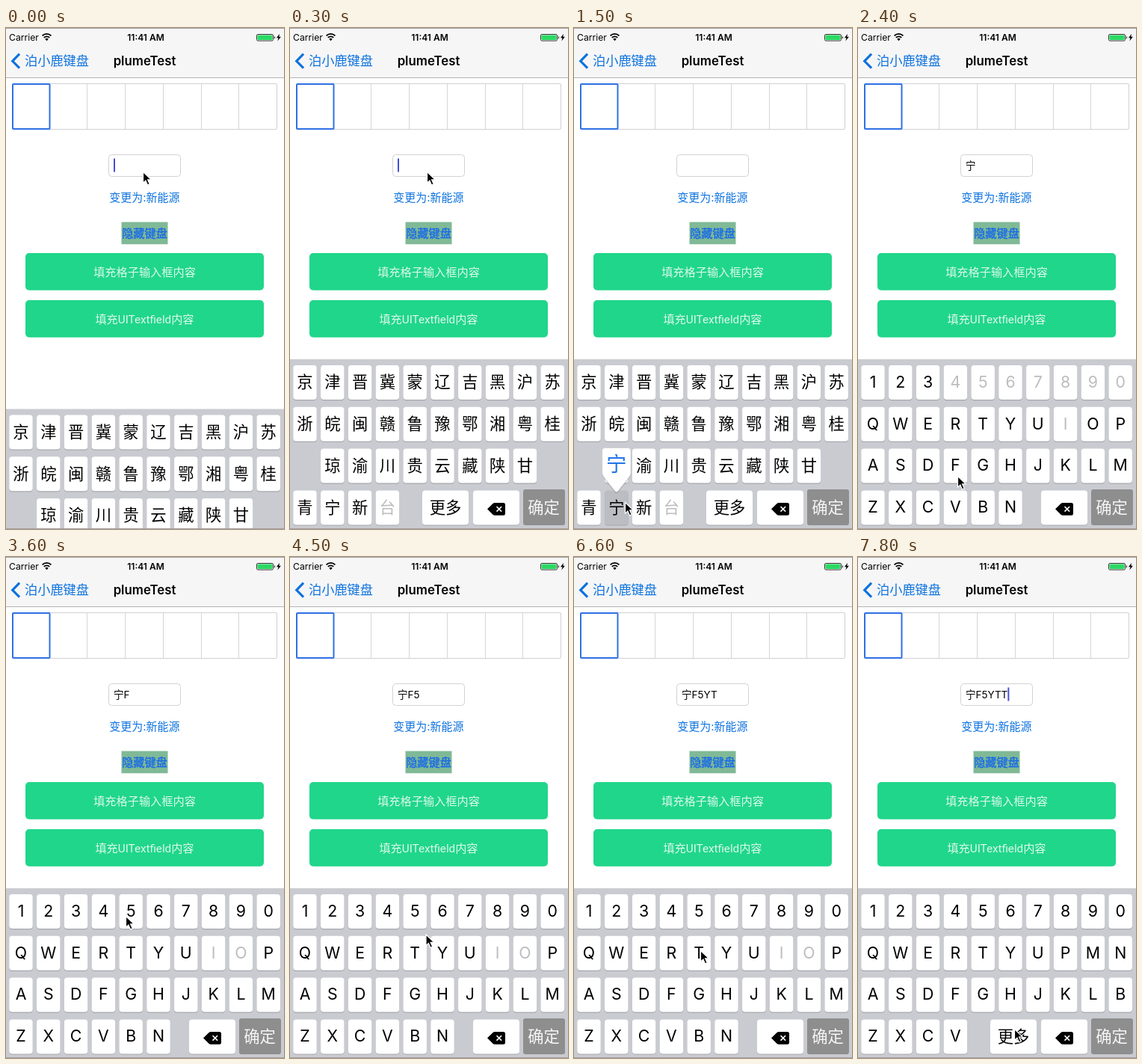
An HTML page for the animation above (8 s loop, 372 by 670 pixels).

```html
<!DOCTYPE html>
<html lang="zh-CN">
<head>
<meta charset="utf-8">
<title>Plate keyboard</title>
<style>
html, body { margin: 0; width: 100%; height: 100%; overflow: hidden; background: #fff; }
svg { display: block; width: 372px; height: 670px; }
text { font-family: Inter, "Noto Sans CJK SC", "Noto Sans CJK", sans-serif; white-space: pre; }
.mid { text-anchor: middle; }
.blue { fill: #0d72de; }
.fill { font: 15.2px Roboto, "Noto Sans CJK SC", "Noto Sans CJK", sans-serif; fill: #fff; fill-opacity: .85; }
.key { fill: #fff; }
.shade { fill: #a6a8ad; }
.down { fill: #bbbdc2; }
.cap { font-size: 21.3px; text-anchor: middle; fill: #000; }
.off { fill: #bdbdc0; }
.enter { fill: #fff; fill-opacity: .92; }
.tip { font-size: 27.5px; text-anchor: middle; fill: #1f74e6; }
</style>
</head>
<body>
<svg viewBox="0 0 372 670">
  <rect width="372" height="670" fill="#fff"/>
  <rect width="372" height="66" fill="#f6f6f7"/>
  <rect y="66" width="372" height="1" fill="#b4b4b6"/>
  <rect width="372" height="1" fill="#a2a2a2"/>

  <text x="4" y="16.5" font-size="12.2">Carrier</text>
  <path d="M48.6 10.4a8.2 8.2 0 0 1 11.8 0M50.8 12.9a5.2 5.2 0 0 1 7.4 0" fill="none" stroke="#000" stroke-width="1.9"/>
  <path d="M54.5 17.2l-2.2-2.5a3.2 3.2 0 0 1 4.4 0z"/>
  <text class="mid" x="187" y="16.5" font-size="12" font-weight="600">11:41 AM</text>
  <rect x="335.5" y="8.5" width="22" height="8.6" rx="1.6" fill="#fff" stroke="#333"/>
  <rect x="336.5" y="9.5" width="20" height="6.6" rx=".8" fill="#2bd964"/>
  <path d="M358.8 11v3.6q1.4-.4 1.4-1.8t-1.4-1.8z" fill="#333"/>
  <path d="M366 7.8l-4 5.4h2.5l-1.2 4.2 4.6-5.6h-2.6z"/>

  <path class="blue" d="M16.9 33.6l2.3 2.2-8.3 8.4 8.3 8.4-2.3 2.2L6.5 44.2z"/>
  <text class="blue" x="25" y="50.4" font-size="17.2">泊小鹿键盘</text>
  <text class="mid" x="185.5" y="50" font-size="16.8" font-weight="600">plumeTest</text>

  <rect x="8.5" y="74.5" width="354" height="61" rx="1.5" fill="#fff" stroke="#d0d0d6"/>
  <path d="M108.5 75v60M159.5 75v60M210.5 75v60M261.5 75v60M311.5 75v60" stroke="#d6d6da"/>
  <rect x="9" y="75" width="49.5" height="60" rx="1" fill="none" stroke="#2f70e4" stroke-width="2"/>

  <rect x="137.5" y="169.5" width="96" height="29" rx="4" fill="#fff" stroke="#d2d2d4"/>
  <text id="plate" x="144" y="189" font-size="13.5"></text>
  <rect id="caret" y="174.5" width="2" height="18" fill="#444fd4"/>

  <text class="mid blue" x="185.3" y="232" font-size="15">变更为:新能源</text>
  <rect x="154.5" y="259.5" width="62" height="29.700" fill="#80b996"/>
  <text class="mid" x="185.5" y="280" font-size="15.2" fill="#176ae8" stroke="#176ae8" stroke-width=".35">隐藏键盘</text>

  <g fill="#20d68a">
    <rect x="26" y="301" width="319" height="49.700" rx="5"/>
    <rect x="26" y="364" width="319" height="49.700" rx="5"/>
  </g>
  <text class="fill mid" x="185.5" y="332">填充格子输入框内容</text>
  <text class="fill mid" x="185.5" y="395">填充UITextfield内容</text>

  <g id="board"></g>
  <rect y="669" width="372" height="1" fill="#a2a2a2"/>
  <path id="arrow" d="M.5 .5v14.600l3.400-3.200 2.600 6 2.700-1.200-2.600-5.800h4.700z" stroke="#fff" stroke-width="1.2"/>
</svg>

<script>
const LOOP = 8000, STEP = 300;
const $ = id => document.getElementById(id);

const letters = ["1234567890", "QWERTYUIOP", "ASDFGHJKLM", "ZXCVBN"];
const layouts = {
  region: { rows: ["京津晋冀蒙辽吉黑沪苏", "浙皖闽赣鲁豫鄂湘粤桂", " 琼渝川贵云藏陕甘", "青宁新台"], off: "台", more: true },
  city: { rows: letters, off: "4567890I" },
  body: { rows: letters, off: "IO" },
  last: { rows: ["1234567890", "QWERTYUPMN", "ASDFGHJKLB", "ZXCV"], off: "", more: true }
};

// from this time on: typed text and layout
const edits = [
  [0, "", "region"], [1800, "宁", "city"], [3000, "宁F", "body"], [4200, "宁F5", "body"],
  [5100, "宁F5Y", "body"], [6300, "宁F5YT", "body"], [7200, "宁F5YTT", "last"]
];
const presses = { 1500: "宁", 2700: "F", 3900: "5", 4800: "Y", 6000: "T", 6900: "T" };

// pointer stops: time, x, y
const stops = [
  [300, 183, 192], [1500, 68, 634], [1800, 68, 634], [2400, 133, 599], [3000, 133, 599],
  [3600, 160, 480], [4200, 160, 480], [4800, 203, 529], [5100, 203, 529], [6000, 169, 526],
  [7200, 169, 526], [7800, 209, 631]
];

const colX = i => 4.3 + 36.8 * i;
const rowY = r => 451 + 55.8 * r;

function keyBox(x, y, w, cls = "key") {
  const box = (dy, c) => `<rect class="${c}" x="${x}" y="${y + dy}" width="${w}" height="46" rx="4"/>`;
  return box(1.2, "shade") + box(0, cls);
}

function label(ch, x, y, cls) {
  const drop = ch.charCodeAt(0) > 255 ? 7.7 : 7.2;
  return `<text class="${cls}" x="${x}" y="${y + drop}">${ch}</text>`;
}

function popup(ch, x, y) {
  const l = x - 3.5, r = x + 35, m = x + 15.7, t = y - 57;
  const d = `M${l + 4} ${t}H${r - 4}q4 0 4 4V${t + 33}q0 4-3 7L${m + 2} ${y + 1}q-2 2-4 0` +
    `L${l + 3} ${t + 40}q-3-3-3-7V${t + 4}q0-4 4-4z`;
  return `<path d="${d}" fill="#777" opacity=".35" transform="translate(0 1.8)"/>` +
    `<path d="${d}" fill="#fff" stroke="#c4c5c8" stroke-width=".6"/>` +
    `<text class="tip" x="${m}" y="${t + 31.5}">${ch}</text>`;
}

function drawBoard({ rows, off, more }, pressed) {
  let out = '<rect y="443" width="372" height="227" fill="#c9cbd1"/>', tip = "";
  rows.forEach((row, r) => [...row].forEach((ch, i) => {
    if (ch === " ") return;
    const x = colX(i), y = rowY(r), down = ch === pressed;
    out += keyBox(x, y, 31.4, down ? "down" : "key");
    out += label(ch, x + 15.7, y + 22.5, off.includes(ch) ? "cap off" : "cap");
    if (down) tip = popup(ch, x, y);
  }));
  const y = rowY(3);
  if (more) out += keyBox(177, y, 62) + label("更多", 208, y + 22.5, "cap");
  out += keyBox(245, y, 62);
  out += '<path d="M264 643.3l7.5-7.2q1-1 2.5-1h11.5q2.5 0 2.5 2.5v11.6q0 2.5-2.5 2.5H274q-1.5 0-2.5-1z"/>';
  out += '<path d="M276.5 640l6.6 6.6m0-6.6l-6.6 6.6" stroke="#fff" stroke-width="1.6"/>';
  out += '<rect x="312" y="617" width="56" height="48" rx="3" fill="#8e8e8f"/>';
  out += label("确定", 339.5, y + 22.5, "cap enter");
  return out + tip;
}

function pointerAt(t) {
  const n = stops.findIndex(s => s[0] >= t);
  if (n < 1) return (n ? stops[stops.length - 1] : stops[0]).slice(1);
  const [a, b] = [stops[n - 1], stops[n]];
  const k = (t - a[0]) / (b[0] - a[0]), e = k * k * (3 - 2 * k);
  return [1, 2].map(i => a[i] + (b[i] - a[i]) * e);
}

function draw(t) {
  const [, text, layout] = edits.filter(e => e[0] <= t).pop();
  const plate = $("plate");
  plate.textContent = text;
  $("caret").setAttribute("x", 144 + (text ? plate.getComputedTextLength() : 0));
  $("caret").setAttribute("visibility", (t + 350) % 1000 < 700 ? "visible" : "hidden");
  $("board").innerHTML = drawBoard(layouts[layout], presses[t]);
  $("board").setAttribute("transform", `translate(0 ${t < STEP ? 66.5 : 0})`);
  $("arrow").setAttribute("transform", `translate(${pointerAt(t).join(" ")})`);
}

const start = performance.now();
let shown = -1;
function tick() {
  const t = (performance.now() - start) % LOOP;
  const held = Math.floor(t / STEP) * STEP;
  if (held !== shown) draw(shown = held);
  requestAnimationFrame(tick);
}
tick();
</script>
</body>
</html>
```
